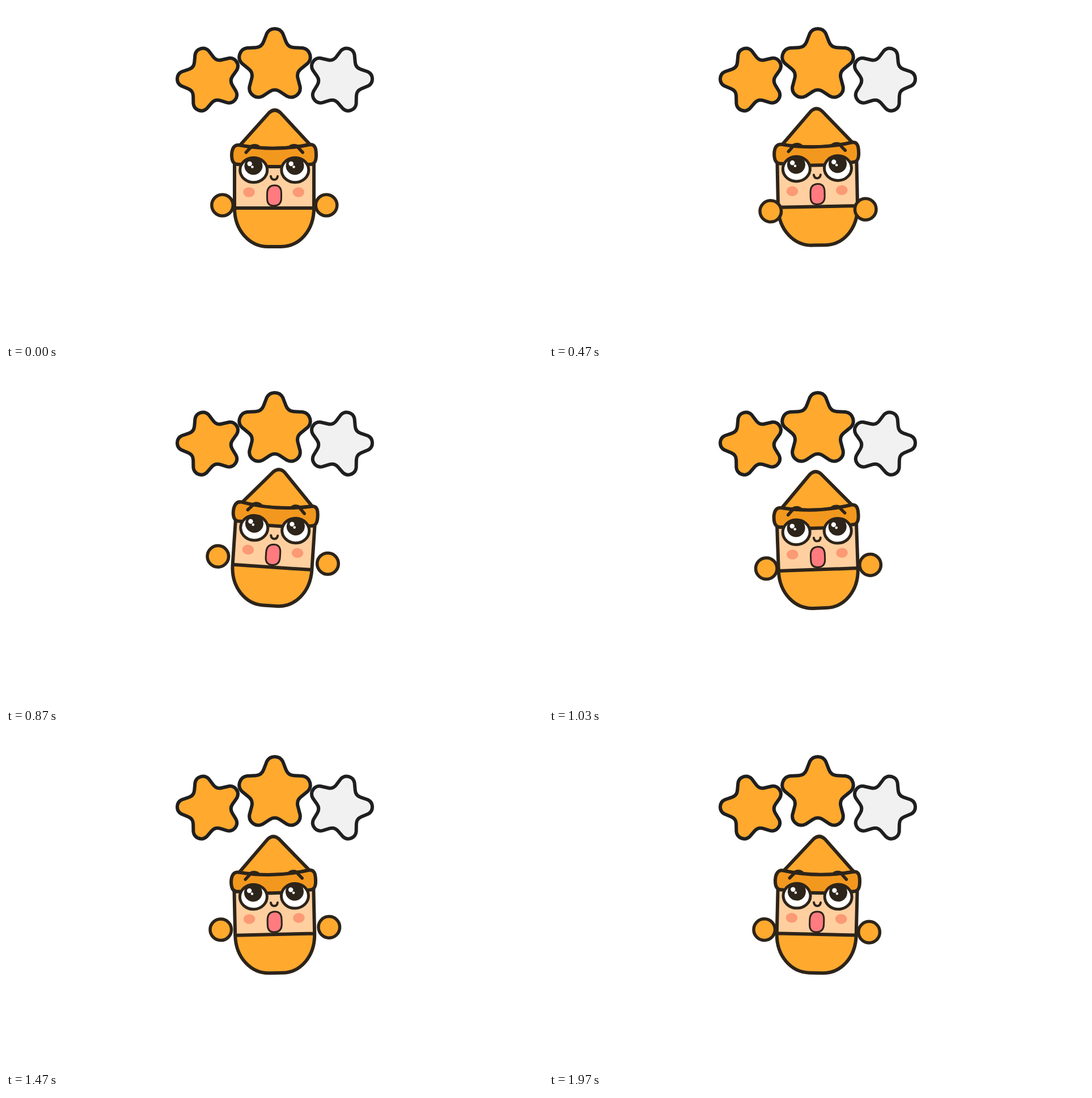
Recreate the animation shown at these times as an HTML page. Size 947 by 592 pixels, loop 2010 ms.

```html
<!DOCTYPE html>
<html lang="en">
<head>
<meta charset="utf-8">
<title>Two of three stars</title>
<style>
  html, body { margin: 0; width: 100%; height: 100%; overflow: hidden; background: #fff; }
  svg { display: block; width: 100vw; height: 100vh; }
  .line { stroke: #2d241a; stroke-width: 6; stroke-linejoin: round; stroke-linecap: round; }
  .orange { fill: #ffa92e; }
  .bare { fill: none; }
  .dark { fill: #2d241a; }
</style>
</head>
<body>
<svg viewBox="0 0 947 592">
  <g id="stars" stroke="#1f1f20" stroke-width="6" stroke-linejoin="round"></g>
  <g id="hero">
    <path fill="#ffcf9f" d="M403 262H543V356H403Z"/>
    <path class="orange" d="M403 356C403 396 430 424 462 424H485C517 424 543 396 543 356Z"/>
    <path class="line bare" d="M403 262V356C403 396 430 424 462 424H485C517 424 543 396 543 356V262M403 356H543"/>

    <path class="line orange" d="M412 246L464 188Q474 179 484 188L536 244Q474 257 412 246Z"/>
    <path class="line" fill="#f3981e" d="M411 245Q474 257 537 244C546 244 547 253 547 263C547 274 544 279 536 279Q505 283 486 283H460Q440 283 411 279C402 280 398 274 398 263C398 252 402 244 411 245Z"/>
    <g id="eyes"></g>
    <path class="line bare" style="stroke-width:4" d="M467 300Q468 306 473 306Q478 306 479 300"/>
    <path class="line" style="stroke-width:3" fill="#ff7b80" d="M460.500 331C460.500 321 465 316 474 316C482 316 485.500 321 485.500 330V338C485.500 347 481 352 472 352C464 352 460.500 347 460.500 339Z"/>
    <g fill="#fb9a74">
      <ellipse cx="428.500" cy="328" rx="10.300" ry="8.700"/>
      <ellipse cx="515.800" cy="328" rx="10.300" ry="8.700"/>
    </g>
    <g class="line orange" style="stroke-width:5.500">
      <circle id="leftHand" r="18.800"/>
      <circle id="rightHand" r="18.800"/>
    </g>
  </g>
</svg>
<script>
const LOOP = 2010, STEPS = 60, STEP = 100 / 3, HOP = LOOP / 4;
const PIVOT = { x: 473.3, y: 303.5 };
const el = id => document.getElementById(id);
const mix = (a, b, k) => a + (b - a) * k;

// Star with round tips and soft valleys, first tip at angle `turn` (degrees).
function star(cx, cy, scale, turn, fill) {
  const polar = (r, deg, x = cx, y = cy) => {
    const a = deg * Math.PI / 180;
    return [x + r * scale * Math.cos(a), y + r * scale * Math.sin(a)];
  };
  const toward = (p, q) => [mix(p[0], q[0], 0.6), mix(p[1], q[1], 0.6)];
  const r = 16 * scale;
  let d = '';
  for (let i = 0; i < 5; i++) {
    const a = turn + i * 72;
    const tip = polar(49, a), next = polar(49, a + 72);
    const start = polar(16, a - 63, ...tip), end = polar(16, a + 63, ...tip);
    const nextStart = polar(16, a + 9, ...next), valley = polar(40, a + 36);
    d += `${i ? 'L' : 'M'}${start}A${r} ${r} 0 0 1 ${end}L${toward(end, valley)}Q${valley} ${toward(nextStart, valley)}`;
  }
  return `<path fill="${fill}" d="${d}Z"/>`;
}

function eye(x, side) {
  const brow = `M${x - 13.5 * side} 258L${x - 5 * side} 249M${x - 5 * side} 247.500Q${x + 2 * side} 244 ${x + 8 * side} 247.500`;
  return `<path class="line bare" style="stroke-width:5.500" d="${brow}"/>
    <ellipse class="line" style="stroke-width:5" fill="#fff" cx="${x}" cy="289" rx="24" ry="21.800"/>
    <circle class="dark" cx="${x - 0.3}" cy="281.500" r="16"/>
    <g fill="#fff"><circle cx="${x - 7}" cy="278" r="4.200"/><circle cx="${x - 2.3}" cy="283.500" r="2.300"/></g>`;
}

el('stars').innerHTML =
  star(359.1, 130, 0.879, 182, '#ffa92e') +
  star(474, 105, 1, -90, '#ffa92e') +
  star(588.9, 130, 0.879, -2, '#f1f1f1');
el('eyes').innerHTML = eye(436.7, 1) + eye(509.8, -1);

// Hand lift over the loop: [ms, lift], 1 is fully raised, -1 drooped.
const lifts = [
  [0, 0], [220, 0.9], [330, 0.6], [470, -1], [540, 0.15], [740, 0.7], [870, 0.67], [1020, 0],
  [1170, 0.03], [1270, 0.9], [1470, 0.48], [1590, 0], [1730, 0.16], [1800, 0.6], [1970, 0.09], [LOOP, 0]
];

function liftAt(t) {
  const i = lifts.findIndex(([ms]) => ms > t);
  const [t0, a] = lifts[i - 1], [t1, b] = lifts[i];
  const k = (t - t0) / (t1 - t0);
  return mix(a, b, k * k * (3 - 2 * k));
}

const ease = x => x + 1.1 * x * (1 - x) ** 2;

function hopHeight(u) {
  return u < 0.5 ? ease(2 * u) : 1 - ease(2 * u - 1);
}

function placeHand(id, side, lift) {
  el(id).setAttribute('cx', PIVOT.x + side * (91.7 + 8 * lift));
  el(id).setAttribute('cy', PIVOT.y + 47.5 - 11.5 * lift);
}

function draw(t) {
  const hop = Math.floor(t / HOP);
  const height = hopHeight(t / HOP - hop);
  const tilt = (hop % 2 ? 9.5 : -9.5) * height;
  el('hero').setAttribute('transform',
    `translate(0 ${-21 * height}) rotate(${tilt} ${PIVOT.x} ${PIVOT.y})`);
  const lift = liftAt(t);
  placeHand('leftHand', -1, lift);
  placeHand('rightHand', 1, lift);
}

// Poses hold for a thirtieth of a second, each starting at a time rounded to 10 ms.
function poseTime(t) {
  return Math.min(STEPS - 1, Math.floor((t + 4) / STEP)) * STEP;
}

const began = performance.now();
function tick() {
  draw(poseTime((performance.now() - began) % LOOP));
  requestAnimationFrame(tick);
}
draw(0);
requestAnimationFrame(tick);
</script>
</body>
</html>
```
